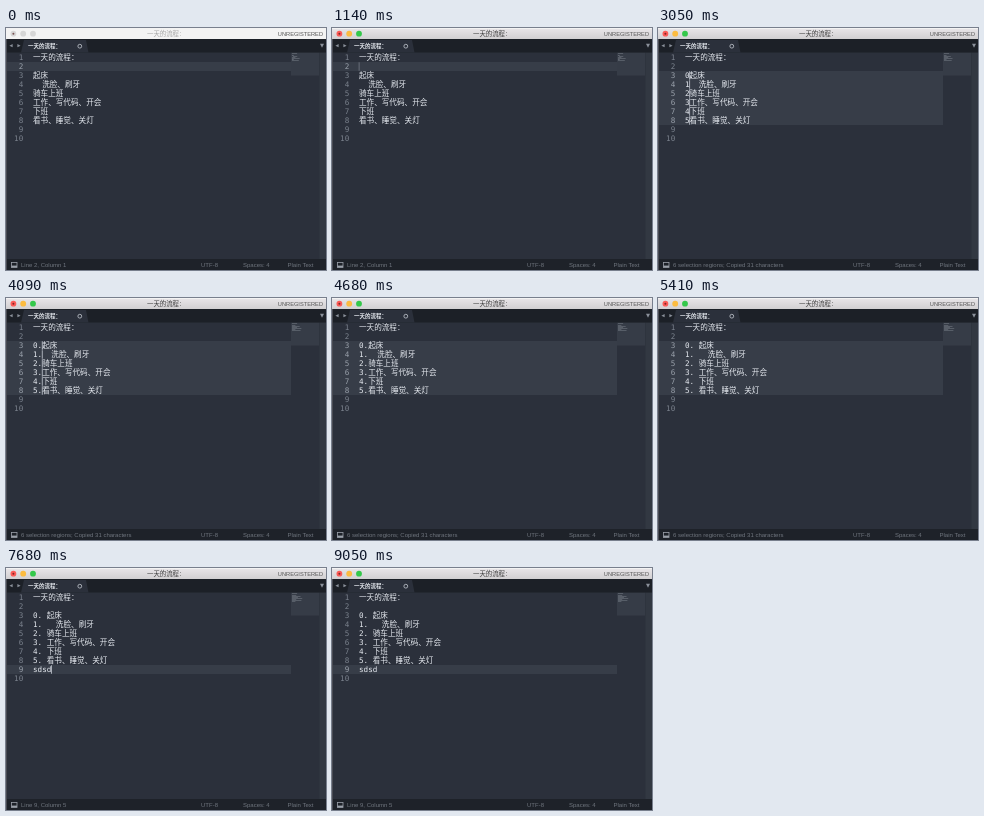
An HTML page with a canvas for the animation above (9.1 s loop, 320 px wide and 242 px high).

```html
<!DOCTYPE html>
<html lang="zh-CN">
<head>
<meta charset="utf-8">
<style>
html, body { margin: 0; width: 100%; height: 100%; overflow: hidden; background: #2b303b; }
canvas { display: block; }
</style>
</head>
<body>
<canvas id="stage" width="320" height="242"></canvas>
<script>
const ctx = document.getElementById('stage').getContext('2d');
const LOOP = 9100, ROW = 9, TOP = 25, LEFT = 27, EDITOR_RIGHT = 285;
const CODE = "500 7.6px 'DejaVu Sans Mono', 'Noto Sans CJK SC', 'Noto Sans CJK', monospace";
const UI = "'Liberation Sans', 'Noto Sans CJK SC', 'Noto Sans CJK', sans-serif";
const TITLE = '一天的流程：';
const BODY = ['起床', '  洗脸、刷牙', '骑车上班', '工作、写代码、开会', '下班', '看书、睡觉、关灯'];
const ALL = [3, 4, 5, 6, 7, 8];
const COPIED = '; Copied 31 characters';

const selecting = (at, row, col, lines, chars) =>
  ({ at, carets: [row], col, sel: true, status: `${lines} lines, ${chars} characters selected` });

// Each step changes the editor state from its time on.
const STEPS = [
  { at: -650, carets: [2], col: 0, prefix: 0, typed: '', sel: false, split: false, status: 'Line 2, Column 1' },
  { at: 1410, carets: [3], status: 'Line 3, Column 1' },
  selecting(1680, 4, 0, 2, 3),
  selecting(1770, 5, 0, 3, 10),
  selecting(1860, 6, 0, 4, 15),
  selecting(2000, 7, 0, 5, 25),
  selecting(2100, 8, 0, 6, 28),
  selecting(2250, 8, 3, 6, 31),
  { at: 2450, status: 'Copied 31 characters' },
  { at: 2600, carets: ALL, split: true, status: '6 selection regions' + COPIED },
  { at: 2800, sel: false, split: false, col: 0 },
  { at: 3000, prefix: 1, col: 1 },
  { at: 4090, prefix: 2, col: 2 },
  { at: 4770, prefix: 3, col: 3 },
  { at: 6040, carets: [3], status: 'Line 3, Column 4' + COPIED },
  { at: 6700, carets: [9], col: 0, status: 'Line 9, Column 1' },
  ...[7230, 7300, 7360, 7420].map((at, i) =>
    ({ at, typed: 'sdsd'.slice(0, i + 1), col: i + 1, status: `Line 9, Column ${i + 2}` })),
];

const stateAt = t => Object.assign({}, ...STEPS.filter(s => s.at <= t));
const clamp = v => Math.max(0, Math.min(1, v));
const rowTop = row => TOP + (row - 1) * ROW;

// Caret: on, fade out, off, fade in.
function blink(elapsed) {
  const p = elapsed % 960;
  return p < 660 ? clamp((590 - p) / 230) : clamp((p - 730) / 230);
}

function rect(x, y, w, h, color, radius = 0) {
  ctx.fillStyle = color;
  ctx.beginPath();
  ctx.roundRect(x, y, w, h, radius);
  ctx.fill();
}

function text(str, x, y, font, color, align = 'left') {
  ctx.font = font;
  ctx.fillStyle = color;
  ctx.textAlign = align;
  ctx.fillText(str, x, y);
}

function triangle(x, y, dx, dy, color) {
  ctx.fillStyle = color;
  ctx.beginPath();
  ctx.moveTo(x + dx, y + dy);
  ctx.lineTo(x - dx + dy, y - dy + dx);
  ctx.lineTo(x - dx - dy, y - dy - dx);
  ctx.fill();
}

function dot(x, y, r, color) {
  ctx.fillStyle = color;
  ctx.beginPath();
  ctx.arc(x, y, r, 0, 7);
  ctx.fill();
}

function textWidth(str) {
  ctx.font = CODE;
  return ctx.measureText(str).width;
}

function drawTitleBar(active) {
  const bar = ctx.createLinearGradient(0, 0, 0, 11);
  bar.addColorStop(0, '#e9e6e9');
  bar.addColorStop(1, '#d2d0d2');
  rect(0, 0, 320, 11, '#f3f3f3');
  ctx.globalAlpha = active;
  rect(0, 1, 320, 10, bar);
  ctx.globalAlpha = 1;
  ['#fc5b57', '#fdbc40', '#34c84a'].forEach((color, i) => {
    const x = 7.4 + i * 9.8;
    dot(x, 5.7, 2.9, '#d6d6d6');
    ctx.globalAlpha = active;
    dot(x, 5.7, 2.9, color);
    ctx.globalAlpha = 1;
  });
  dot(7.4, 5.7, 1, 'rgba(70,10,10,.65)');
  const gray = Math.round(165 - 105 * active);
  text(TITLE, 160.2, 8.2, '6.4px ' + UI, `rgb(${gray},${gray},${gray})`, 'center');
  text('UNREGISTERED', 317, 7.9, '5.7px ' + UI, '#555', 'right');
}

function drawTabs() {
  rect(0, 11, 320, 13.5, '#1c2027');
  ctx.fillStyle = '#2b303b';
  ctx.beginPath();
  ctx.moveTo(15, 24.5);
  ctx.lineTo(18, 12);
  ctx.lineTo(80, 12);
  ctx.lineTo(82.5, 24.5);
  ctx.fill();
  triangle(5, 17.7, -1.6, 0, '#8b919b');
  triangle(13, 17.7, 1.6, 0, '#8b919b');
  triangle(316, 17.7, 0, 2, '#8b919b');
  text(TITLE, 22, 20.1, 'bold 5.5px ' + UI, '#e4e8ee');
  ctx.strokeStyle = '#c4c9d1';
  ctx.lineWidth = 0.8;
  ctx.beginPath();
  ctx.arc(73.8, 18.2, 1.9, 0, 7);
  ctx.stroke();
}

function drawSelection(state, lines) {
  const last = Math.max(...state.carets);
  for (let row = 3; row <= last; row++) {
    const line = lines[row - 1];
    const newline = state.split ? '' : ' ';
    const part = row < last ? line + newline : line.slice(0, state.col);
    if (part) rect(LEFT, rowTop(row), textWidth(part), ROW, '#4f5963', 1);
  }
}

function drawEditor(state, t) {
  const numbered = BODY.map((line, i) => `${i}. `.slice(0, state.prefix) + line);
  const lines = [TITLE, '', ...numbered, state.typed, ''];

  rect(EDITOR_RIGHT, 24.5, 28, 23, '#363c47');
  rect(313.5, 24.5, 6.5, 206.5, '#323842');
  for (const row of state.carets)
    rect(0, rowTop(row), state.sel ? 20 : EDITOR_RIGHT, ROW, '#373d48');
  if (state.sel) drawSelection(state, lines);

  lines.forEach((line, i) => {
    const base = rowTop(i + 1) + 7.1;
    const current = state.carets.includes(i + 1);
    text(i + 1, 17.2, base, CODE, current ? '#9aa1ab' : '#7b828d', 'right');
    text(line, LEFT, base, CODE, '#e6eaf0');
    const indent = line.search(/\S/);
    if (indent >= 0)
      rect(286 + indent * 0.5, 25.3 + i, (line.length - indent) * 0.85, 0.6, 'rgba(216,222,233,.35)');
  });

  ctx.globalAlpha = blink(t - state.at);
  for (const row of state.carets) {
    const x = LEFT + textWidth(lines[row - 1].slice(0, state.col));
    rect(x - 0.3, rowTop(row) + 0.3, 0.8, ROW - 0.6, '#c5cad3');
  }
  ctx.globalAlpha = 1;
}

function drawStatusBar(status) {
  const font = '6px ' + UI, color = '#70767f';
  rect(0, 231, 320, 11, '#1e2229');
  ctx.strokeStyle = '#9ba1aa';
  ctx.lineWidth = 0.8;
  ctx.strokeRect(5.4, 234.4, 5.6, 5);
  rect(5.4, 237.6, 5.6, 1.6, '#9ba1aa');
  text(status, 15, 239, font, color);
  text('UTF-8', 195, 239, font, color);
  text('Spaces: 4', 237, 239, font, color);
  text('Plain Text', 281.5, 239, font, color);
}

function draw() {
  const t = performance.now() % LOOP;
  const state = stateAt(t);
  rect(0, 0, 320, 242, '#2b303b');
  drawEditor(state, t);
  drawTitleBar(clamp((t - 600) / 220));
  drawTabs();
  drawStatusBar(state.status);
  rect(0, 11, 1, 231, '#4a4c54');
  requestAnimationFrame(draw);
}
draw();
</script>
</body>
</html>
```
